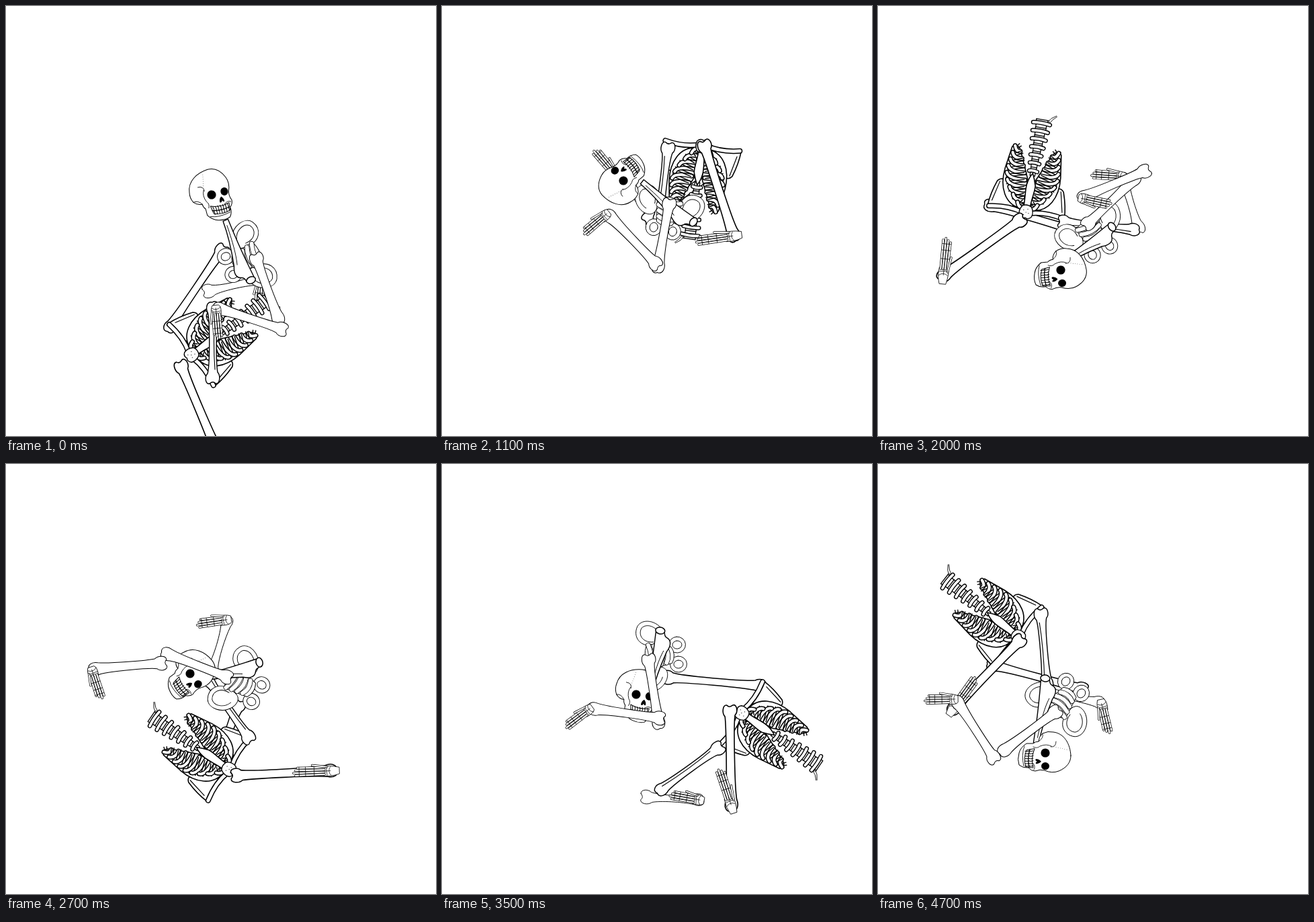
An HTML page with a canvas for the animation above (4.8 s loop, 640 by 640 pixels).

```html
<!DOCTYPE html>
<html lang="en">
<head>
<meta charset="utf-8">
<title>Tumbling skeleton</title>
<style>
html, body { margin: 0; width: 100%; height: 100%; overflow: hidden; background: #fff; }
canvas { display: block; width: 640px; height: 640px; }
</style>
</head>
<body>
<canvas id="stage" width="640" height="640"></canvas>
<script>
const g = document.getElementById('stage').getContext('2d');
const STEP = 100, STEPS = 48;
const KEYS = [0, 11, 20, 27, 35, 42, 47];
const RAD = Math.PI / 180;
g.lineJoin = g.lineCap = 'round';

// --- drawing helpers -------------------------------------------------
function shape(d, width, fill = '#fff') {
  const p = new Path2D(d);
  if (fill) { g.fillStyle = fill; g.fill(p); }
  if (width) { g.lineWidth = width; g.strokeStyle = '#000'; g.stroke(p); }
}
const line = (d, width) => shape(d, width, null);

function oval(x, y, rx, ry, width, fill = '#fff') {
  g.beginPath();
  g.ellipse(x, y, rx, ry, 0, 0, 2 * Math.PI);
  g.fillStyle = fill;
  g.fill();
  if (width) { g.lineWidth = width; g.strokeStyle = '#000'; g.stroke(); }
}

// A white tube with a black edge along a path.
function tube(d, width, edge) {
  const p = new Path2D(d);
  g.lineWidth = width; g.strokeStyle = '#000'; g.stroke(p);
  g.lineWidth = width - 2 * edge; g.strokeStyle = '#fff'; g.stroke(p);
}

function dots(points, r) {
  for (const [x, y] of points) oval(x, y, r, r, 0, '#000');
}

// --- body parts, each around its own joint ---------------------------
const bone = (len, half, width, inner) => () => {
  const s = half, e = half + 3;
  shape(`M-7-5C-9-11 3-13 8-8C20 ${-s} ${len - 28} ${-s} ${len - 12} ${-e}
    C${len - 3}-12 ${len + 6}-8 ${len + 4}-1C${len + 8} 6 ${len} 11 ${len - 9} ${e}
    C${len - 28} ${s} 22 ${s} 10 7C4 12-8 10-7 4C-4 1-4-1-7-5Z`, width);
  if (inner) line(`M14 3C40 1 70 1 ${len - 8} 3`, width * .8);
};

const hand = (len, heel) => () => {
  const w = .8;
  shape(`M${-heel}-5Q0-9 12-7L13 6Q4 9 ${-heel} 5Z`, w);
  for (let i = 0; i < 4; i++) {
    const y = -5 + i * 3.4, tip = len - 3 * Math.abs(i - 1);
    tube(`M10 ${y}L${tip} ${y * 1.1}`, 3.6, .7);
    for (const k of [.45, .68, .85]) line(`M${len * k} ${y - 1.5}v3`, .7);
  }
  tube(`M6 6L${len * .5} 9`, 3.4, .7);
  line('M0-7Q6-1 1 6M6-7L7 6M1 0L12 0', .7);
};

function drawPelvis() {
  const w = .9;
  for (const s of [-1, 1]) {
    shape(`M${s * 16}-12C${s * 14}-36 ${s * 32}-44 ${s * 46}-36
      C${s * 58}-28 ${s * 53}-6 ${s * 36} 2C${s * 26} 6 ${s * 16} 4 ${s * 16}-12Z`, w);
    line(`M${s * 21}-14C${s * 21}-31 ${s * 34}-36 ${s * 43}-30C${s * 50}-22 ${s * 44}-8 ${s * 32}-4`, w);
    oval(s * 14.5, 21, 12, 12.5, w);
    oval(s * 14.5, 21, 6, 7, w);
  }
  shape('M-19-24Q0-32 19-24L12 12Q0 19-12 12Z', w);
  for (let i = 0; i < 4; i++) {
    const y = -20 + i * 8.5, h = 17 - i * 2;
    tube(`M${-h} ${y - 2}Q0 ${y + 4} ${h} ${y - 2}`, 7.5, .8);
  }
}

function rib(s, u) {
  const out = 15 + 26 * Math.sin(Math.min(1, u * 1.7) * Math.PI / 2) - 8 * u * u;
  const inn = 5 + 19 * u * u, y = 8 + 82 * u;
  line(`M${s * inn} ${y + 7}L${s * out} ${y - 1}M${s * (inn + 3)} ${y + 10}L${s * out} ${y + 3}`, 1.4);
  tube(`M${s * inn} ${y - 1}Q${s * (out - 3)} ${y - 3} ${s * out} ${y + 6}`, 7, 1.5);
}

function drawChest() {
  const w = 1.6;
  line('M-2 138Q-13 135-15 143L-21 149M1 140Q-10 138-13 145L-20 150M-9 137L-11 141', .8);
  for (let i = 6; i >= 0; i--) {
    const y = 62 + i * 12, h = 6 + i * 1.1;
    shape(`M${-h * .6} ${y - 6}H${h * .6}L${h * .7} ${y + 7}H${-h * .7}Z`, 1.3);
    tube(`M${-h} ${y + 1}Q0 ${y + 3} ${h} ${y + 1}`, 6.5, 1.4);
  }
  for (const s of [-1, 1]) {
    shape(`M${s * 58} 2Q${s * 57} 20 ${s * 50} 40Q${s * 44} 48 ${s * 36} 40L${s * 20} 6Z`, w);
    line(`M${s * 53} 10L${s * 46} 40`, 1.2);
    shape(`M${s * 6} 5C${s * 34} 6 ${s * 45} 32 ${s * 42} 60L${s * 37} 94
      Q${s * 30} 101 ${s * 24} 91L${s * 6} 50Z`, w);
    for (let i = 8; i >= 0; i--) rib(s, i / 8);
    tube(`M${s * 5} 0Q${s * 28} 7 ${s * 56} 1`, 8, 1.5);
  }
  shape('M-5 6C-4 20-8 32-7 42Q-4 52 0 60Q5 52 6 42C7 32 4 20 5 6Z', w);
  shape('M-9-5Q-4-10 0-7Q5-10 9-5Q12 2 7 10Q0 14-7 10Q-12 2-9-5Z', 1.4);
  dots([[-4, 0], [3, -3], [4, 4], [-2, 6], [0, 1]], .6);
}

function drawNeck() {
  shape('M4 6C30 5 45 3 98 4L98-4C75-5 50-10 30-15C22-19 13-20 10-12C8-6 4-8 0-6Z', 1.4);
  line('M30-10C45-5 60-3 90-1', .9);
  oval(1, 0, 5, 7, 1.5);
}

function drawSkull() {
  const w = 1;
  shape(`M4-38C-14-37-29-28-31-12Q-33-4-29 4Q-24 10-17 10Q-17 15-14 18L-14 28
    Q-8 37 0 39Q10 42 18 39Q23 33 22 25Q27 21 27 15Q24 8 26 1Q31-10 27-20C22-32 14-38 4-38Z`, w);
  line('M-29 4Q-22 2-17 10M-10-9Q-14-2-10 8Q-6 12-9 18M-17-16Q-8-16-9-8M16 18Q20 14 25 17M-10 31Q2 36 20 32', .8);
  dots(Array.from({ length: 8 }, (_, i) => [-5 - i * .7, -32 + i * 3.2]), .4);
  oval(0, 0, 6.6, 6.6, 0, '#000');
  oval(19.6, 0, 5.6, 6, 0, '#000');
  shape('M13 6Q17 10 16 14Q14 15 13 12Q11 16 9 14Q9 9 13 6Z', 0, '#000');
  shape('M-6 16Q8 22 22 18L21 29Q8 33-4 28Z', w);
  line('M-5 23Q8 27 21 24', 1.3);
  for (let i = 0; i < 7; i++) {
    const x = -3 + i * 3.7;
    line(`M${x} 18Q${x + 1.5} 22 ${x} 25M${x + .6} 25L${x + .4} 30`, 1);
  }
}

// --- poses: x, y and turn at each key, kept relative to the parent ----
function part(parent, draw, x, y, turn) {
  const local = { x: [], y: [], a: [] };
  KEYS.forEach((_, i) => {
    const p = parent ? { x: parent.x[i], y: parent.y[i], a: parent.turn[i] } : { x: 0, y: 0, a: 0 };
    const c = Math.cos(p.a * RAD), s = Math.sin(p.a * RAD);
    const dx = x[i] - p.x, dy = y[i] - p.y;
    local.x.push(dx * c + dy * s);
    local.y.push(dy * c - dx * s);
    local.a.push(turn[i] - p.a);
  });
  return { parent, draw, x, y, turn, local };
}

function tip(parent, draw, len, turn) {
  const x = parent.x.map((v, i) => v + len * Math.cos(parent.turn[i] * RAD));
  const y = parent.y.map((v, i) => v + len * Math.sin(parent.turn[i] * RAD));
  return part(parent, draw, x, y, turn);
}

const pelvis = part(null, drawPelvis,
  [352, 334, 322, 355, 330, 272, 278],
  [378, 312, 345, 330, 285, 310, 349],
  [67, 13, -28, -58, -94, -122, -142]);
const link = part(pelvis, bone(143, 4.5, 1.5),
  [322, 307, 300, 346, 335, 304, 305],
  [362, 318, 336, 358, 318, 325, 335],
  [124, -36, -163.5, -250, -355, -450, -525]);
const chest = part(link, drawChest,
  [275, 388, 220, 333, 445, 350, 210],
  [520, 207, 308, 455, 370, 232, 258],
  [234, 8, -170, -236, -416, -502, -592]);
const leg = part(chest, bone(146, 5.5, 1.6),
  [260, 390, 212, 342, 428, 337, 211],
  [535, 207, 318, 464, 366, 235, 262],
  [67, -288, -576, -723, -991, -1152, -1306]);
const foot = tip(leg, hand(56, 12), 142, [157, -188, -444, -542, -828, -981, -1134]);
const armB = part(chest, bone(110, 4.5, 1.4, true),
  [308, 336, 275, 362, 412, 380, 242],
  [555, 210, 322, 408, 422, 248, 222],
  [270, 97, 6, -125, -216, -416, -635]);
const foreB = part(armB, bone(82, 4, .9),
  [300, 313, 388, 306, 303, 448, 252],
  [425, 310, 332, 310, 496, 137, 340],
  [347, 227, 253, 287, 363, -15, -349]);
const handB = tip(foreB, hand(46, 5), 82, [455, 230, 184, 172, 190, -256, -643]);
const neck = part(pelvis, drawNeck,
  [365, 375, 349, 378, 325, 260, 249],
  [409, 322, 328, 295, 247, 267, 318],
  [-113, -142, -216, -195, -260, -241, -262]);
const skull = part(neck, drawSkull,
  [306, 270, 272, 274, 289, 213, 249],
  [281, 260, 393, 312, 343, 358, 430],
  [-15, -130, -276, -307, -352, -284, -270]);
const armA = part(pelvis, bone(101, 5.5, 1),
  [372, 338, 312, 330, 307, 258, 265],
  [375, 293, 325, 317, 290, 322, 368],
  [70, 100, -44, -159, -279, -253, -217]);
const foreA = part(armA, bone(104, 5.5, 1),
  [412, 319, 398, 232, 325, 217, 173],
  [481, 384, 245, 296, 378, 426, 438],
  [198, 226, 157, 175, 188, 361, 237]);
const handA = tip(foreA, hand(46, 3), 105, [85, 140, 12, 72, 143, 275, 179]);

const order = [foreB, handB, link, chest, armB, leg, foot, pelvis, neck, skull, armA, foreA, handA];

// Smooth curve through the key values.
function curve(v, n) {
  const last = KEYS.length - 1;
  let i = 0;
  while (i < last - 1 && n >= KEYS[i + 1]) i++;
  const slope = k => {
    const a = Math.max(0, k - 1), b = Math.min(last, k + 1);
    return (v[b] - v[a]) / (KEYS[b] - KEYS[a]);
  };
  const h = KEYS[i + 1] - KEYS[i], t = (n - KEYS[i]) / h, r = 1 - t;
  return r * r * (1 + 2 * t) * v[i] + t * t * (3 - 2 * t) * v[i + 1]
    + h * t * r * (r * slope(i) - t * slope(i + 1));
}

function place(p, n) {
  if (p.parent) place(p.parent, n);
  g.translate(curve(p.local.x, n), curve(p.local.y, n));
  g.rotate(curve(p.local.a, n) * RAD);
}

let shown = -1;
function frame() {
  const n = Math.floor(performance.now() / STEP) % STEPS;
  if (n !== shown) {
    shown = n;
    g.fillStyle = '#fff';
    g.fillRect(0, 0, 640, 640);
    for (const p of order) {
      g.save();
      place(p, n);
      p.draw();
      g.restore();
    }
  }
  requestAnimationFrame(frame);
}
frame();
</script>
</body>
</html>
```
